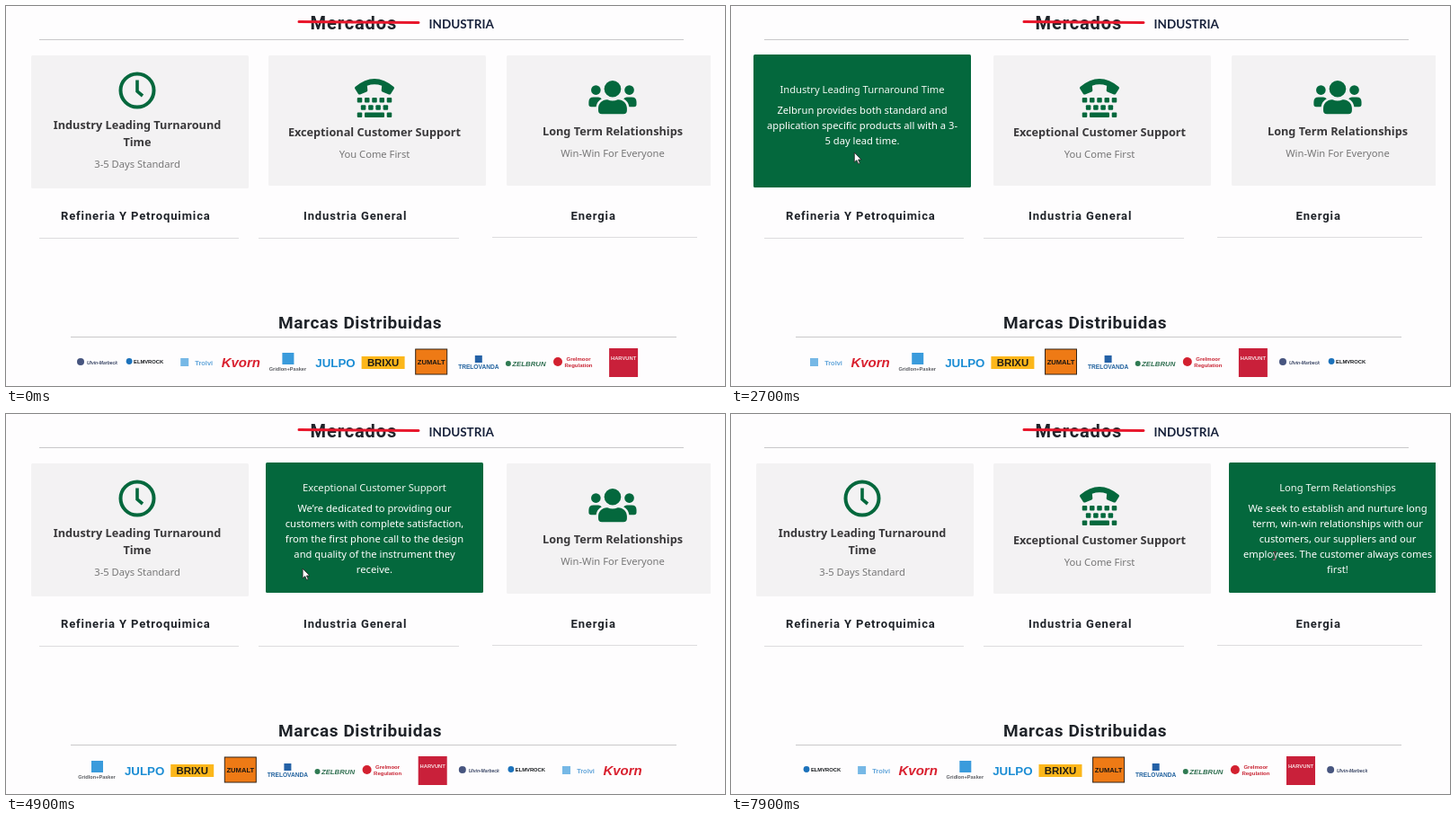
Write an HTML page that moves like this. It is 800 px wide and 423 px high and loops after 8000 ms.

```html
<!DOCTYPE html>
<html lang="es">
<head>
<meta charset="utf-8">
<title>Mercados</title>
<style>
  html, body { margin: 0; width: 100%; height: 100%; overflow: hidden; background: #fefdfe; }
  body > * { position: absolute; left: 0; top: 0; }
  #cards { width: 784px; height: 423px; overflow: hidden; }
  #cards svg { position: absolute; }
  #cards text { text-anchor: middle; font: 11.2px "Noto Sans", sans-serif; fill: #777; }
  #cards .title { font-weight: 600; font-size: 12.7px; fill: #3a393b; }
  #cards .light { fill: #eef6f1; }
  #cards .body { fill: #fff; font-weight: 500; }
  .head { font: 700 20px Roboto, sans-serif; fill: #1f2329; letter-spacing: .9px; }
  .market { font: 700 13px Roboto, sans-serif; fill: #1f2329; letter-spacing: .88px; }
  .logo { font-family: "Liberation Sans", sans-serif; font-weight: 700; text-anchor: middle; }
</style>
</head>
<body>
<svg width="800" height="423">
  <text class="head" x="338.5" y="25.5">Mercados</text>
  <path d="M326 17.5L459 18.5" stroke="#e8172c" stroke-width="3" stroke-linecap="round"/>
  <text x="470.5" y="25" font-family="Lato, sans-serif" font-weight="700" font-size="13.5" fill="#16203a">INDUSTRIA</text>
  <path d="M37 37.5H754M72 368.5H746" stroke="#c9c8ca"/>
  <path d="M37 258.5H259M281 258.5H504M541 257.5H769" stroke="#dddcde"/>
  <text class="market" x="61" y="238">Refineria Y Petroquimica</text>
  <text class="market" x="331" y="238">Industria General</text>
  <text class="market" x="628.5" y="237.5">Energia</text>
  <text class="head" x="303" y="359" style="font-size:19px;letter-spacing:.6px">Marcas Distribuidas</text>
  <clipPath id="view"><path d="M75 375H713V421H75Z"/></clipPath>
  <g clip-path="url(#view)"><g id="strip"></g></g>
</svg>
<div id="cards"></div>
<svg width="800" height="423">
  <path id="arrow" d="M0 0V11L2.6 8.6L4.4 12.6L6.2 11.9L4.4 8H7.8Z" fill="#fff" stroke="#2a2a2a" stroke-width=".9"/>
  <path id="beam" d="M603 153.5H607M605 153.5V162M603 162H607" fill="none" stroke="#5a3038"/>
</svg>
<script>
const GREEN = '#04683d', LOOP = 8000, FLIP = 400, SLOT = 53.1;
const $ = id => document.getElementById(id);
const clamp = v => Math.max(0, Math.min(1, v));

// Logo strip: coordinates are relative to the slot centre
const word = (s, x, y, size, fill, extra = '') =>
  `<text class="logo" x="${x}" y="${y}" font-size="${size}" fill="${fill}" ${extra}>${s}</text>`;
const dot = (x, y, r, fill) => `<circle cx="${x}" cy="${y}" r="${r}" fill="${fill}"/>`;
const box = (x, y, w, h, fill, extra = '') =>
  `<rect x="${x}" y="${y}" width="${w}" height="${h}" fill="${fill}" ${extra}/>`;
const italic = 'font-style="italic"';

const logos = [
  dot(-18, 396, 4, '#47557f') + word('Ulvin-Marbeck', 6, 398.5, 5, '#3b4766', italic),
  dot(-17, 395.5, 3.4, '#1c72bb') + word('ELMVROCK', 4.5, 398, 5.8, '#15181c'),
  box(-13, 392, 9, 9, '#76b8e6') + word('Trolvi', 13, 399.5, 7.4, '#62a5da', 'font-weight="400"'),
  word('Kvorn', 1, 402, 15, '#d9202f', italic),
  box(-6, 386, 13, 13, '#3a9bdc') + word('Gridlon+Pasker', 0, 406, 5.6, '#5b5d62'),
  word('JULPO', 0, 402, 13.3, '#1c8dd4'),
  box(-24, 390, 48, 14, '#fcb71b') + word('BRIXU', 0, 401.2, 11.4, '#201c14'),
  box(-17, 382, 35, 28, '#ee7a15', 'stroke="#33251a"') + word('ZUMALT', .5, 399, 7.6, '#1d1712'),
  box(-4, 389, 8, 8, '#2461a6') + word('TRELOVANDA', 0, 403.5, 6.6, '#23639f'),
  dot(-20, 398, 3, '#2f7a52') + word('ZELBRUN', 3, 400.5, 7.8, '#2f6f50', italic),
  dot(-18, 396, 5, '#d3202f') + word('Grelmoor', 5, 395, 6, '#c92534') + word('Regulation', 5, 401.5, 6, '#c92534'),
  box(-14, 381, 32, 32, '#c9203a') + word('HARVUNT', 2, 394, 5.8, '#f8dfe2')
];
$('strip').innerHTML = [...logos, ...logos]
  .map((logo, i) => `<g transform="translate(${101 + SLOT * i} 0)">${logo}</g>`).join('');

// Flip cards
const keys = (y, offsets, w = 5.5) =>
  offsets.map(dx => box(410 + dx - w / 2, y, w, 5.5, GREEN, 'rx="1"')).join('');
const cards = [
  { x: 146, h: 148, on: 920, off: 3230,
    icon: `<g fill="none" stroke="${GREEN}" stroke-width="4"><circle cx="146" cy="94" r="18.5"/>
      <path d="M146 82.5V95L152 100" stroke-width="3.6"/></g>`,
    title: ['Industry Leading Turnaround', 'Time'], y: 136.5, sub: '3-5 Days Standard', subY: 179.5,
    name: 'Industry Leading Turnaround Time', nameY: 97,
    body: ['Zelbrun provides both standard and', 'application specific products all with a 3-', '5 day lead time.'] },
  { x: 410, h: 145, on: 3617, off: 5950,
    icon: `<path d="M388.5 90Q410 72 431.500 90Q432.300 91 431.800 92L428 97.900Q427.200 98.800 426 98.400
      L418.700 95.500Q417.600 95 417.700 93.800L418.200 88.700Q410 85.800 401.800 88.700L402.300 93.800
      Q402.400 95 401.300 95.500L394 98.400Q392.800 98.800 392 97.900L388.200 92Q387.700 91 388.500 90Z" fill="${GREEN}"/>`
      + keys(102, [-16.5, -8.25, 0, 8.25, 16.5]) + keys(110.2, [-12.4, -4.1, 4.1, 12.4])
      + keys(118.4, [-16.5, 16.5]) + keys(118.4, [0], 22),
    title: ['Exceptional Customer Support'], y: 145, sub: 'You Come First', subY: 168.5,
    name: 'Exceptional Customer Support', nameY: 86,
    body: ['We’re dedicated to providing our', 'customers with complete satisfaction,',
      'from the first phone call to the design', 'and quality of the instrument they', 'receive.'] },
  { x: 675, h: 145, on: 6430, off: LOOP,
    icon: `<g fill="${GREEN}" transform="translate(648.4 80.3) scale(.083)">`
      + dot(320, 144, 112, GREEN) + dot(96, 160, 64, GREEN) + dot(544, 160, 64, GREEN)
      + `<path d="M243 288h8q69 32 138 0h8c63 0 115 52 115 115v29q0 48-48 48H176q-48 0-48-48v-29c0-63 52-115 115-115Z
      M64 256h64q26 0 45 19-65 36-75 109H32q-32 0-32-32v-32q0-64 64-64Z
      M576 256h-64q-26 0-45 19 65 36 75 109h66q32 0 32-32v-32q0-64-64-64Z"/></g>`,
    title: ['Long Term Relationships'], y: 144, sub: 'Win-Win For Everyone', subY: 168,
    name: 'Long Term Relationships', nameY: 86,
    body: ['We seek to establish and nurture long', 'term, win-win relationships with our',
      'customers, our suppliers and our', 'employees. The customer always comes', 'first!'] }
];

for (const c of cards) {
  const lines = (list, y, step, cls) =>
    list.map((s, i) => `<text class="${cls}" x="${c.x}" y="${y + i * step}">${s}</text>`).join('');
  const face = (color, left, top, content) => {
    $('cards').insertAdjacentHTML('beforeend',
      `<svg style="left:${left}px;top:${top}px" width="242" height="${c.h}"
        viewBox="${left} ${top} 242 ${c.h}">${box(left, top, 242, c.h, color, 'rx="1.5"')}${content}</svg>`);
    return $('cards').lastElementChild;
  };
  c.front = face('#f3f2f3', c.x - 118, 55,
    c.icon + lines(c.title, c.y, 19, 'title') + lines([c.sub], c.subY, 0, ''));
  c.back = face(GREEN, c.x - 121, 54,
    lines([c.name], c.nameY, 0, 'light') + lines(c.body, c.nameY + 23, 17, 'body'));
}

// cubic-bezier(.175, .885, .32, 1.275): overshoots before settling
function spring(x) {
  if (x <= 0 || x >= 1) return clamp(x);
  const curve = (s, a, b) => 3 * (1 - s) ** 2 * s * a + 3 * (1 - s) * s * s * b + s ** 3;
  let lo = 0, hi = 1;
  for (let i = 0; i < 24; i++) {
    const mid = (lo + hi) / 2;
    if (curve(mid, .175, .32) < x) lo = mid; else hi = mid;
  }
  return curve(lo, .885, 1.275);
}

// Carousel: one slot every 1400 ms, rewinding after four
function slide(t) {
  const n = Math.floor((t - 220) / 1400);
  if (n < 0) return 0;
  const u = clamp((t - 220 - n * 1400) / 380), e = u * u * (3 - 2 * u);
  const from = n % 5, to = (n + 1) % 5;
  return from + (to - from) * e;
}

const trail = [[650, 62, 228], [920, 88, 175], [1100, 97, 147], [1800, 110, 156], [2700, 137, 163],
  [3230, 268, 178], [3615, 290, 180], [3700, 322, 179], [4200, 329, 174], [4900, 330, 172],
  [5600, 390, 174], [5950, 531, 172], [6430, 553, 165], [6500, 570, 162]];

function draw(t) {
  $('strip').setAttribute('transform', `translate(${-SLOT * slide(t)} 0)`);

  for (const c of cards) {
    const y = t < c.off ? spring((t - c.on) / FLIP) : 1 - spring((t - c.off) / FLIP);
    const showFront = Math.cos(y * Math.PI) > 0;
    const turn = a => `perspective(740px) rotateY(${a}deg)`;
    c.front.style.transform = turn(180 * y);
    c.back.style.transform = turn(180 * y - 180);
    c.front.style.visibility = showFront ? 'visible' : 'hidden';
    c.back.style.visibility = showFront ? 'hidden' : 'visible';
  }

  const i = trail.findIndex(p => p[0] > t);
  $('arrow').style.display = i > 0 ? '' : 'none';
  if (i > 0) {
    const [a, b] = [trail[i - 1], trail[i]], u = (t - a[0]) / (b[0] - a[0]);
    $('arrow').setAttribute('transform', `translate(${a[1] + (b[1] - a[1]) * u} ${a[2] + (b[2] - a[2]) * u})`);
  }
  $('beam').style.display = t >= 7300 ? '' : 'none';
}

const start = performance.now();
function tick() {
  draw((performance.now() - start) % LOOP);
  requestAnimationFrame(tick);
}
tick();
</script>
</body>
</html>
```
